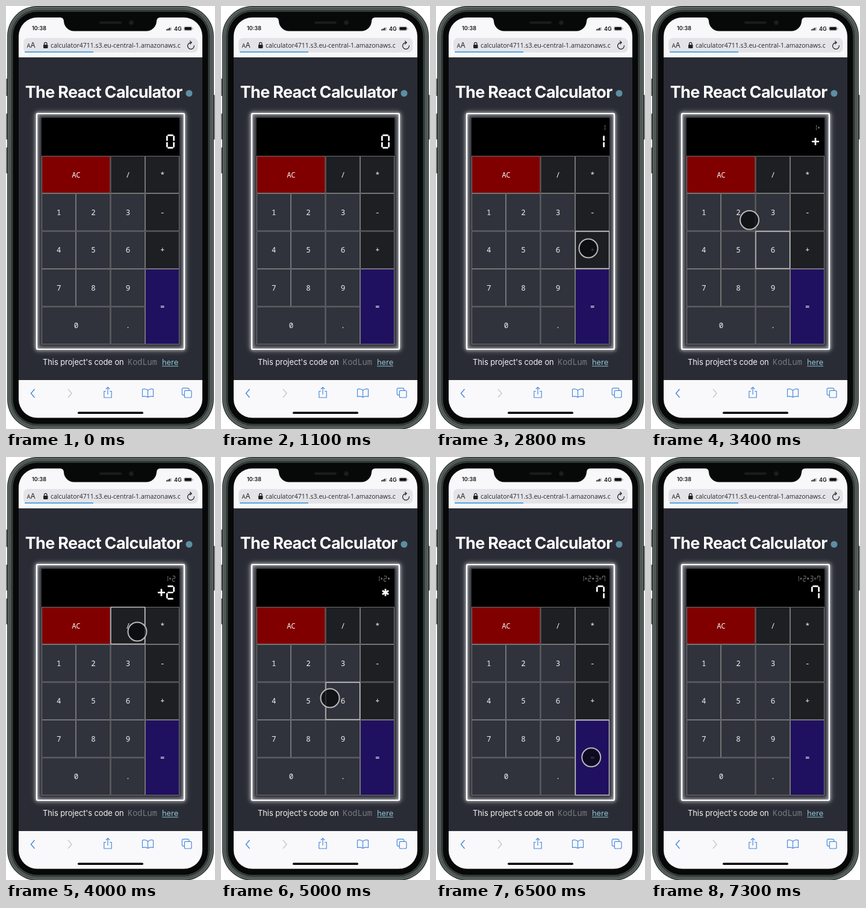
Recreate the animation shown at these times as an HTML page with a canvas. Size 347 by 700 pixels, loop 7.4 s.

```html
<!DOCTYPE html>
<html lang="en">
<head>
<meta charset="utf-8">
<title>Calculator on a phone</title>
<style>
html, body { margin: 0; width: 100%; height: 100%; overflow: hidden; background: #fff; }
canvas { display: block; width: 347px; height: 700px; }
</style>
</head>
<body>
<canvas id="stage"></canvas>
<script>
const W = 347, H = 700, LOOP = 7400, STEP = 100;
const canvas = document.getElementById('stage');
const ctx = canvas.getContext('2d');
const dpr = window.devicePixelRatio || 1;
canvas.width = W * dpr;
canvas.height = H * dpr;

const SANS = 'Inter, "Open Sans", sans-serif';
const MONO = '"Noto Sans Mono", monospace';
const BLUE = '#4a8ade', PAGE = '#2a2c35', KEY = '#30333b', OP = '#1d1f22';

// Column and row edges of the keypad
const COLS = [59, 116, 173.5, 231, 288];
const ROWS = [248, 310, 372.5, 435, 497.5, 560];

function key(label, col, row, color = KEY, colSpan = 1, rowSpan = 1) {
  const x = COLS[col], y = ROWS[row];
  return { label, color, x, y, w: COLS[col + colSpan] - x, h: ROWS[row + rowSpan] - y };
}

const keys = [
  key('AC', 0, 0, '#800000', 2), key('/', 2, 0, OP), key('*', 3, 0, OP),
  key('1', 0, 1), key('2', 1, 1), key('3', 2, 1), key('-', 3, 1, OP),
  key('4', 0, 2), key('5', 1, 2), key('6', 2, 2), key('+', 3, 2, OP),
  key('7', 0, 3), key('8', 1, 3), key('9', 2, 3), key('=', 3, 3, '#201060', 1, 2),
  key('0', 0, 4, KEY, 2), key('.', 2, 4)
];

// Display states: start time, formula line, entry line
const entries = [
  [0, '', '0'], [2200, '1', '1'], [3000, '1+', '+'], [3600, '1+2', '+2'],
  [4400, '1+2*', '*'], [5400, '1+2*3', '*3'], [6200, '1+2*3=7', '7']
];

// Pointer path: time, x, y
const path = [
  [1500, 75, 370], [1900, 84, 357], [2100, 88, 348], [2300, 88, 348],
  [2700, 240, 396], [2800, 253, 401], [2900, 258, 404], [3100, 258, 404],
  [3500, 146, 345], [3700, 146, 345], [3900, 204, 299], [4000, 218, 289],
  [4200, 257, 279], [4450, 257, 279], [4700, 228, 345], [4900, 186, 394],
  [5000, 181, 399], [5250, 198, 351], [5450, 198, 351], [5700, 214, 418],
  [5800, 227, 447], [6100, 257, 495], [6400, 257, 495], [6800, 262, 508]
];

function slope(i, axis) {
  const a = path[i - 1], b = path[i], c = path[i + 1];
  if (!a || !c) return 0;
  const before = b[axis] - a[axis], after = c[axis] - b[axis];
  return before * after <= 0 ? 0 : (before + after) / (c[0] - a[0]);
}

function pointerAt(t) {
  const i = path.findIndex((p, n) => n < path.length - 1 && t >= p[0] && t < path[n + 1][0]);
  if (i < 0) return null;
  const a = path[i], b = path[i + 1], d = b[0] - a[0], u = (t - a[0]) / d;
  const [x, y] = [1, 2].map(axis =>
    a[axis] + (b[axis] - a[axis]) * u * u * (3 - 2 * u) +
    d * u * (1 - u) * (slope(i, axis) * (1 - u) - slope(i + 1, axis) * u));
  return { x, y };
}

function box(x, y, w, h, r, color) {
  ctx.beginPath();
  ctx.roundRect(x, y, w, h, r);
  ctx.fillStyle = color;
  ctx.fill();
}

function frame(x, y, w, h, r, color, width) {
  ctx.beginPath();
  ctx.roundRect(x, y, w, h, r);
  ctx.strokeStyle = color;
  ctx.lineWidth = width;
  ctx.stroke();
}

function disc(x, y, r, color) {
  ctx.beginPath();
  ctx.arc(x, y, r, 0, 7);
  ctx.fillStyle = color;
  ctx.fill();
}

function line(color, width, ...pts) {
  ctx.beginPath();
  for (let i = 0; i < pts.length; i += 2) ctx.lineTo(pts[i], pts[i + 1]);
  ctx.strokeStyle = color;
  ctx.lineWidth = width;
  ctx.stroke();
}

function text(str, x, y, font, color, align = 'left', spacing = 0) {
  ctx.font = font;
  ctx.fillStyle = color;
  ctx.textAlign = align;
  ctx.letterSpacing = spacing + 'px';
  ctx.fillText(str, x, y);
}

function drawBody() {
  for (const [x, y, h] of [[0.5, 120, 29], [0.5, 178, 43], [0.5, 234, 43], [343, 147, 74]])
    box(x, y, 3.5, h, 1, '#3c4341');
  // Metal rim from the outside in: inset and colour
  const rim = [[0, '#2d3433'], [1.5, '#68716e'], [3, '#4a5250'], [5, '#59615f'],
    [6.5, '#2c3130'], [8, '#3d4342'], [9.5, '#070808']];
  for (const [d, color] of rim)
    box(2 + d, d, 343 - 2 * d, 701 - 2 * d, 50 - d, color);
}

function drawStatus() {
  box(96, 10, 154, 31.5, [0, 0, 17, 17], '#070808');
  for (const [x, corner] of [[96, -1], [250, 1]]) {
    ctx.beginPath();
    ctx.moveTo(x, 26);
    ctx.quadraticCurveTo(x, 19, x + 6 * corner, 19);
    ctx.lineTo(x, 18);
    ctx.fillStyle = '#070808';
    ctx.fill();
  }
  box(155, 25.5, 37, 4, 2, '#1b1c1e');
  disc(208, 27.5, 4.3, '#15171b');
  disc(208, 27.5, 2, '#20242f');

  text('10:38', 43, 40, '600 9px ' + SANS, '#111');
  for (let i = 0; i < 4; i++)
    box(266 + i * 2.4, 38.5 - i * 1.2, 1.8, 2 + i * 1.2, 0.4, i < 3 ? '#111' : '#bbb');
  text('4G', 279, 40.5, '600 9px ' + SANS, '#111');
  frame(295.7, 34.2, 13, 6.4, 2, '#888', 0.7);
  box(296.5, 35, 11.4, 4.8, 1.3, '#111');
  box(309.5, 36.3, 1, 2.4, 0.5, '#888');
}

function drawAddress() {
  box(29, 53, 289.5, 24, 7, '#e4e4e8');
  box(31, 75.2, 114, 1.8, 0, '#409bdc');
  text('A', 34.5, 69, '9px ' + SANS, '#222');
  text('A', 40.5, 69, '12px ' + SANS, '#222');
  box(62, 64, 7.5, 6, 1.2, '#222');
  ctx.beginPath();
  ctx.arc(65.75, 62.6, 2.2, Math.PI, 0);
  ctx.lineTo(67.95, 64.5);
  ctx.moveTo(63.55, 62.6);
  ctx.lineTo(63.55, 64.5);
  ctx.strokeStyle = '#222';
  ctx.lineWidth = 1.2;
  ctx.stroke();
  text('calculator4711.s3.eu-central-1.amazonaws.c', 74, 69,
    '10.5px "Open Sans", sans-serif', '#26272a');
  ctx.beginPath();
  ctx.arc(307, 66, 5.4, -0.15, Math.PI * 1.55);
  ctx.strokeStyle = '#222';
  ctx.lineWidth = 1.2;
  ctx.stroke();
  line('#222', 1.2, 305.2, 57.6, 308.2, 60.6, 305.2, 63.4);
}

function drawToolbar() {
  box(21, 619, 305, 63, 0, '#f9f9fb');
  line(BLUE, 1.5, 47.5, 634, 41.5, 641, 47.5, 648);
  line('#c8c9cc', 1.5, 103, 634, 109, 641, 103, 648);

  line(BLUE, 1.2, 166, 637.5, 162.8, 637.5, 162.8, 648, 175.2, 648, 175.2, 637.5, 172, 637.5);
  line(BLUE, 1.2, 169, 643, 169, 631);
  line(BLUE, 1.2, 165.8, 634, 169, 630.8, 172.2, 634);

  ctx.beginPath();
  for (const side of [-1, 1]) {
    ctx.moveTo(235.5, 636);
    ctx.quadraticCurveTo(235.5 + side * 4, 632.5, 235.5 + side * 9, 634.2);
    ctx.lineTo(235.5 + side * 9, 646.5);
    ctx.quadraticCurveTo(235.5 + side * 4, 644.8, 235.5, 647.5);
  }
  ctx.moveTo(235.5, 636);
  ctx.lineTo(235.5, 647.5);
  ctx.lineWidth = 1.2;
  ctx.strokeStyle = BLUE;
  ctx.stroke();

  frame(292.3, 632.3, 11.5, 11.5, 2, BLUE, 1.2);
  box(296, 636, 12, 12, 2, '#f9f9fb');
  frame(296.3, 636.3, 11.7, 11.7, 2, BLUE, 1.2);
  box(119, 671.5, 109, 3.6, 1.8, '#0a0a0a');
}

// Seven-segment digit whose right edge is at x
const SEGMENTS = { 0: 'abcdef', 1: 'bc', 2: 'abged', 3: 'abgcd', 7: 'abcf' };

function bar(x1, y1, x2, y2, t) {
  const r = t / 2, flat = y1 === y2;
  ctx.beginPath();
  if (flat) {
    ctx.moveTo(x1, y1); ctx.lineTo(x1 + r, y1 - r); ctx.lineTo(x2 - r, y1 - r);
    ctx.lineTo(x2, y1); ctx.lineTo(x2 - r, y2 + r); ctx.lineTo(x1 + r, y1 + r);
  } else {
    ctx.moveTo(x1, y1); ctx.lineTo(x1 + r, y1 + r); ctx.lineTo(x1 + r, y2 - r);
    ctx.lineTo(x1, y2); ctx.lineTo(x1 - r, y2 - r); ctx.lineTo(x1 - r, y1 + r);
  }
  ctx.fill();
}

function digit(ch, right, top, w, h, t) {
  const l = right - w + t / 2, r = right - t / 2;
  const y0 = top + t / 2, y2 = top + h - t / 2, y1 = (y0 + y2) / 2, g = t * 0.15;
  const bars = {
    a: [l + g, y0, r - g, y0], g: [l + g, y1, r - g, y1], d: [l + g, y2, r - g, y2],
    f: [l, y0 + g, l, y1 - g], b: [r, y0 + g, r, y1 - g],
    e: [l, y1 + g, l, y2 - g], c: [r, y1 + g, r, y2 - g]
  };
  for (const s of SEGMENTS[ch]) bar(...bars[s], t);
}

function operator(ch, x, y, r, t, color) {
  if (ch === '=') {
    line(color, t, x - r, y - r / 2, x + r, y - r / 2);
    line(color, t, x - r, y + r / 2, x + r, y + r / 2);
    return;
  }
  const arms = ch === '+' ? 2 : 3;
  for (let i = 0; i < arms; i++) {
    const a = Math.PI / 2 + i * Math.PI / arms;
    const dx = r * Math.cos(a), dy = r * Math.sin(a);
    line(color, t, x - dx, y - dy, x + dx, y + dy);
  }
}

function readout(str, right, top, size, color) {
  const { pitch, w, h, t, r } = size;
  [...str].reverse().forEach((ch, i) => {
    const x = right - i * pitch;
    ctx.fillStyle = color;
    if (ch in SEGMENTS) digit(ch, x, top, w, h, t);
    else operator(ch, x - w / 2, top + h / 2, r, t, color);
  });
}

const BIG = { pitch: 15, w: 14, h: 23.5, t: 2.7, r: 6 };
const SMALL = { pitch: 5.9, w: 5, h: 9.5, t: 0.9, r: 1.9 };

function drawPage(t) {
  box(21, 85, 305, 534, 0, PAGE);
  text('The React Calculator', 31.7, 152, '700 27px ' + SANS, '#fff', 'left', -0.7);
  disc(304, 144.5, 5.5, '#5d8ea3');

  ctx.save();
  ctx.shadowColor = '#fff';
  for (const blur of [10, 5]) {
    ctx.shadowBlur = blur * dpr;
    frame(51, 178, 245, 390, 2, '#fff', 2.2);
  }
  ctx.restore();

  box(59, 185, 229, 63, 0, '#000');
  const [, formula, entry] = entries.filter(e => e[0] <= t).pop();
  readout(formula, 281, 196.5, SMALL, '#858585');
  readout(entry, 280, 212.5, BIG, '#fff');

  for (const k of keys) {
    box(k.x, k.y, k.w, k.h, 0, k.color);
    frame(k.x + 0.5, k.y + 0.5, k.w - 1, k.h - 1, 0, '#737476', 1);
    text(k.label, k.x + k.w / 2, k.y + k.h / 2 + 4.5, '500 12.5px ' + MONO, '#f2f2f2',
      'center', -0.5);
  }

  text("This project's code on", 61, 594, '12.9px ' + SANS, '#f4f4f4', 'left', -0.05);
  text('KodLum', 202, 594, '13.6px ' + MONO, '#777a80');
  text('here', 259, 594, '12.8px ' + SANS, '#8ec3d6');
  box(259, 595.5, 27, 1, 0, '#8ec3d6');
}

function drawPointer(t) {
  const p = pointerAt(t);
  if (!p) return;
  // The key outline trails the pointer by one step
  const q = pointerAt(t - STEP) || p;
  const k = keys.find(k => q.x >= k.x && q.x < k.x + k.w && q.y >= k.y && q.y < k.y + k.h);
  if (k) frame(k.x + 0.5, k.y + 0.5, k.w - 1, k.h - 1, 0, '#c4c4c4', 1.3);
  disc(p.x, p.y, 15.5, 'rgba(8, 9, 11, 0.74)');
  ctx.beginPath();
  ctx.arc(p.x, p.y, 15.5, 0, 7);
  ctx.strokeStyle = '#b9b9ba';
  ctx.lineWidth = 2;
  ctx.stroke();
}

function draw(t) {
  ctx.setTransform(dpr, 0, 0, dpr, 0, 0);
  ctx.clearRect(0, 0, W, H);
  drawBody();
  ctx.save();
  ctx.beginPath();
  ctx.roundRect(21, 19, 305, 662.5, 31);
  ctx.clip();
  box(21, 19, 305, 66, 0, '#f8f8fa');
  drawStatus();
  drawAddress();
  drawPage(t);
  drawToolbar();
  drawPointer(t);
  ctx.restore();
}

const start = performance.now();

function tick() {
  const t = Math.max(0, performance.now() - start) % LOOP;
  draw(Math.floor(t / STEP) * STEP);
  requestAnimationFrame(tick);
}

tick();
</script>
</body>
</html>
```
